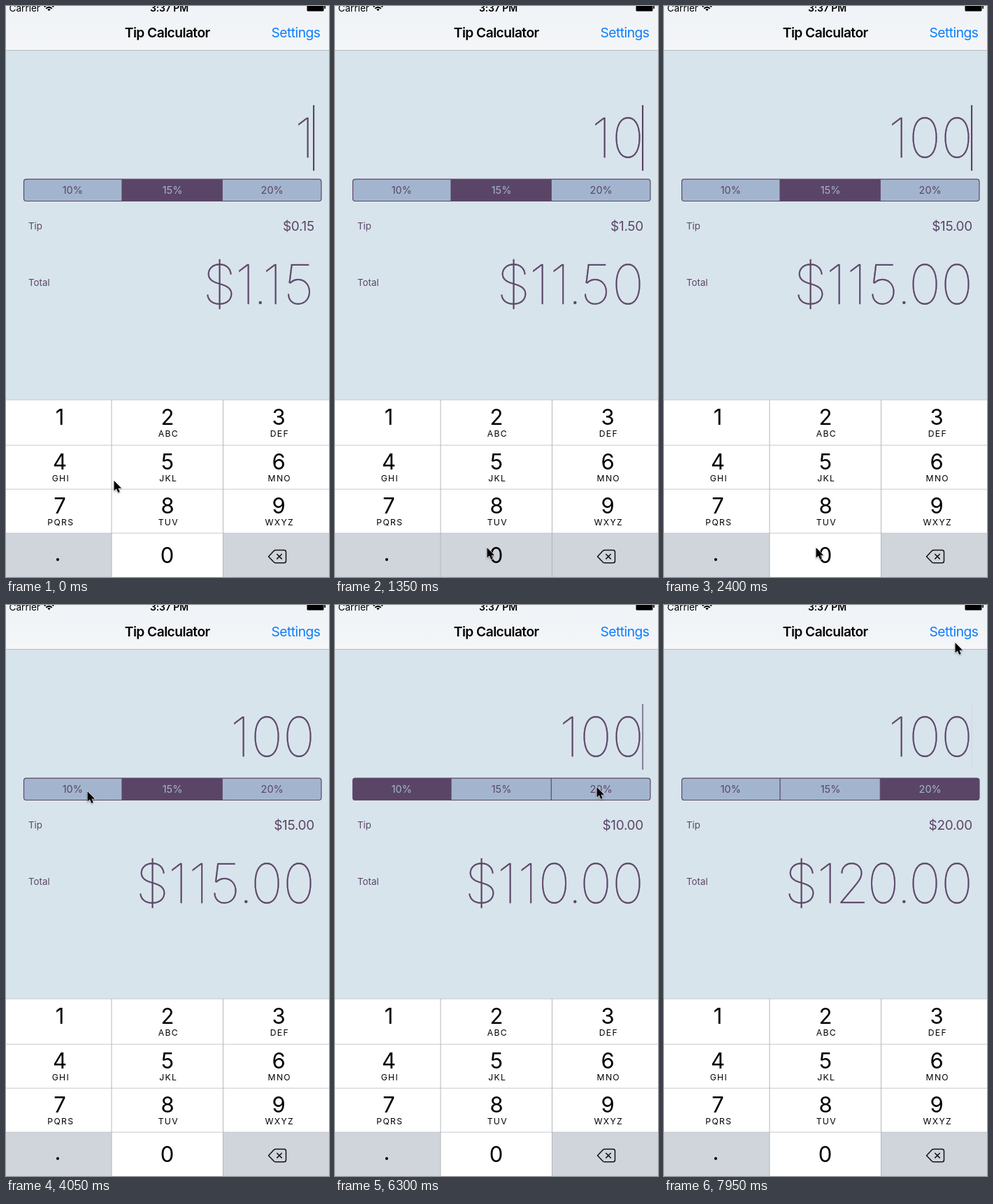
Write an HTML page that moves like this. It is 462x818 px and loops after 8000 ms.

```html
<!DOCTYPE html>
<html lang="en">
<head>
<meta charset="utf-8">
<title>Tip Calculator</title>
<style>
html, body { margin: 0; width: 100%; height: 100%; overflow: hidden; background: #d8e4ec; }
svg { display: block; width: 462px; height: 818px; font-family: Inter, Roboto, sans-serif; }
.mid { text-anchor: middle; }
.end { text-anchor: end; }
.ink { fill: #5b4567; }
.big { font-size: 78px; font-weight: 100; stroke: #5b4567; stroke-width: .35px; }
.label { font-size: 13.3px; }
.seg { font-size: 14.5px; }
.digit { font-size: 31px; }
.letters { font-size: 12.2px; letter-spacing: 1.3px; }
#mouse { filter: drop-shadow(0 1px 1px rgba(0, 0, 0, .35)); }
</style>
</head>
<body>
<svg viewBox="0 0 462 818">
  <defs>
    <linearGradient id="bar" x2="0" y2="1">
      <stop offset="0" stop-color="#eff3f7"/>
      <stop offset="1" stop-color="#f4f6f8"/>
    </linearGradient>
  </defs>
  <rect width="462" height="818" fill="#d8e4ec"/>

  <rect width="462" height="63" fill="url(#bar)"/>
  <rect y="63" width="462" height="1" fill="#b3babf"/>
  <text x="4.5" y="7.5" font-size="13.6">Carrier</text>
  <g fill="none" stroke="#000" stroke-width="1.8">
    <path d="M54.8 1.2Q61.5-4.6 68.2 1.2M57.2 3.6Q61.5 0 65.8 3.6"/>
    <path d="M59.2 4.8Q61.5 3 63.8 4.8L61.5 7.2Z" fill="#000" stroke="none"/>
  </g>
  <text class="mid" x="233.5" y="7.5" font-size="14" font-weight="600" letter-spacing="-.1">3:37 PM</text>
  <rect x="430.5" y="-4" width="24" height="11.5" rx="1.5"/>
  <rect x="455.3" y="-1" width="1.7" height="5" rx=".8"/>
  <text class="mid" x="230.7" y="45" font-size="19.2" font-weight="600" letter-spacing="-.55">Tip Calculator</text>
  <text class="end" x="449.5" y="45" font-size="19.2" letter-spacing="-.5" fill="#0a7cff">Settings</text>

  <text id="bill" class="ink big" y="217"></text>
  <rect id="caret" class="ink" x="439" y="142" width="2.2" height="94"/>

  <g id="segments"></g>

  <text class="ink label" x="32" y="320">Tip</text>
  <text id="tip" class="ink end" x="441" y="322" font-size="19" letter-spacing="-.3"></text>
  <text class="ink label" x="32" y="401">Total</text>
  <text id="total" class="ink big" y="427"></text>

  <g id="keys"></g>
  <path d="M375.5 788.7L383.2 780.6Q384.3 779.5 386 779.5H397.7Q400.5 779.5 400.5 782.3V795Q400.5 797.8 397.7 797.8H386Q384.3 797.8 383.2 796.7ZM387.3 785L394.7 792.4M394.7 785L387.3 792.4" fill="none" stroke="#111" stroke-width="1.5" stroke-linejoin="round"/>

  <path id="mouse" d="M0 0V14.6L3.4 11.5L5.8 17L8.3 16L6 10.7H10.6Z" stroke="#fff" stroke-width="1.1" paint-order="stroke"/>
</svg>
<script>
const LOOP = 8000, TICK = 150;
const $ = id => document.getElementById(id);

function add(parent, tag, attrs, text) {
  const el = document.createElementNS('http://www.w3.org/2000/svg', tag);
  for (const k in attrs) el.setAttribute(k, attrs[k]);
  if (text) el.textContent = text;
  return parent.appendChild(el);
}

// Segmented control
const DARK = '#5b4567', LIGHT = '#a3b5ce';
const edges = [25.5, 166, 309.3, 451];
const segments = ['10%', '15%', '20%'].map((name, i) => {
  const x = edges[i], w = edges[i + 1] - x, g = $('segments');
  const round = `inset(0 round ${i ? 0 : 3.5}px ${i < 2 ? 0 : 3.5}px ${i < 2 ? 0 : 3.5}px ${i ? 0 : 3.5}px)`;
  const box = add(g, 'rect', { x, y: 248, width: w, height: 31.5, style: `clip-path:${round}` });
  if (i) add(g, 'rect', { x: x - .6, y: 248, width: 1.2, height: 31.5, fill: DARK });
  const label = add(g, 'text', { class: 'seg mid', x: [95.3, 238, 380.7][i], y: 269 }, name);
  return { box, label };
});
add($('segments'), 'rect', { x: 25.5, y: 248.1, width: 425.5, height: 31.4, rx: 3.5, fill: 'none', stroke: DARK, 'stroke-width': 1.2 });

// Keypad
const cols = [0, 151, 311, 462], rows = [565, 629, 692, 755, 818];
const centers = [77, 231, 390];
const names = ['', 'ABC', 'DEF', 'GHI', 'JKL', 'MNO', 'PQRS', 'TUV', 'WXYZ'];
const keys = $('keys'), GREY = '#d0d4db';
const cell = (c, r, fill) => add(keys, 'rect',
  { x: cols[c], y: rows[r], width: cols[c + 1] - cols[c], height: rows[r + 1] - rows[r], fill });
add(keys, 'rect', { y: 564, width: 462, height: 254, fill: '#fff' });
cell(0, 3, GREY);
cell(2, 3, GREY);
const zero = cell(1, 3, '#fff');
for (const y of [564, 629, 692, 755]) add(keys, 'rect', { y: y - .3, width: 462, height: 1, fill: '#c6c9cd' });
for (const x of [150.5, 310]) add(keys, 'rect', { x, y: 564, width: 1, height: 254, fill: '#b4b7bb' });
names.forEach((name, i) => {
  const x = centers[i % 3], y = [600, 664, 727][i / 3 | 0];
  add(keys, 'text', { class: 'digit mid', x, y }, String(i + 1));
  add(keys, 'text', { class: 'letters mid', x: x + 1.3, y: y + 17 }, name);
});
add(keys, 'text', { class: 'digit mid', x: 230.5, y: 798 }, '0');
add(keys, 'text', { class: 'digit mid', x: 74, y: 795 }, '.');

// Large amounts: set from the right, each glyph centred by its ink
const advance = { 0: 46, 1: 29.5, 2: 42.5, 5: 46, '.': 13.5, $: 44 };
const shift = { 1: -2, 2: .5 };
const pen = document.createElement('canvas').getContext('2d');
pen.font = '100 78px Inter, Roboto, sans-serif';
const inkMid = ch => {
  const m = pen.measureText(ch);
  return (m.actualBoundingBoxRight - m.actualBoundingBoxLeft) / 2;
};
function setBig(el, text) {
  if (el.textContent === text) return;
  const xs = [];
  let right = 442;
  for (let i = text.length - 1; i >= 0; i--) {
    const ch = text[i], w = advance[ch];
    if (ch === '.' && text[i + 1] === '1') right += 4;
    xs.unshift((right - w / 2 + (shift[ch] || 0) - inkMid(ch)).toFixed(2));
    right -= w;
  }
  el.setAttribute('x', xs.join(' '));
  el.textContent = text;
}

// Timeline
const moves = [
  [0, 750, 217.5, 776],
  [2400, 2850, 149, 262],
  [2850, 3450, 116.5, 267],
  [5250, 6000, 374.5, 261],
  [7200, 7950, 416.5, 54]
];
function mouseAt(t) {
  let x = 154.5, y = 680;
  for (const [from, to, tx, ty] of moves) {
    const p = Math.min(1, Math.max(0, (t - from) / (to - from)));
    const e = p * p * (3 - 2 * p);
    x += (tx - x) * e;
    y += (ty - y) * e;
  }
  return [x, y];
}

const fades = [
  [0, 1], [150, .6], [300, 0], [600, .5], [750, 1], [1200, .6], [1350, 1], [1950, .6], [2100, 1],
  [3000, .5], [3150, 0], [3300, .5], [3450, 1], [3900, .5], [4050, 0], [4350, .5], [4500, 1],
  [4800, .85], [4950, 0], [5400, .5], [5550, 1], [6300, .6], [6450, 0], [6900, .5], [7050, 1],
  [7800, .6], [7950, .04]
];
const held = (list, t) => list.filter(([at]) => at <= t).pop()[1];
const bills = [[0, 1], [1350, 10], [2100, 100]];
const choices = [[0, 1], [4200, 0], [6450, 2]];
const presses = [[0, false], [1200, true], [1500, false], [1950, true], [2250, false]];

function draw(t) {
  const bill = held(bills, t), choice = held(choices, t);
  const tip = bill * (10 + 5 * choice) / 100;
  setBig($('bill'), String(bill));
  setBig($('total'), '$' + (bill + tip).toFixed(2));
  $('tip').textContent = '$' + tip.toFixed(2);
  segments.forEach(({ box, label }, i) => {
    box.setAttribute('fill', i === choice ? DARK : LIGHT);
    label.setAttribute('fill', i === choice ? LIGHT : DARK);
  });
  zero.setAttribute('fill', held(presses, t) ? GREY : '#fff');
  $('caret').setAttribute('opacity', held(fades, t));
  $('mouse').setAttribute('transform', `translate(${mouseAt(t)})`);
}

function loop() {
  const t = performance.now() % LOOP;
  draw(Math.floor(t / TICK) * TICK);
  requestAnimationFrame(loop);
}
loop();
</script>
</body>
</html>
```
